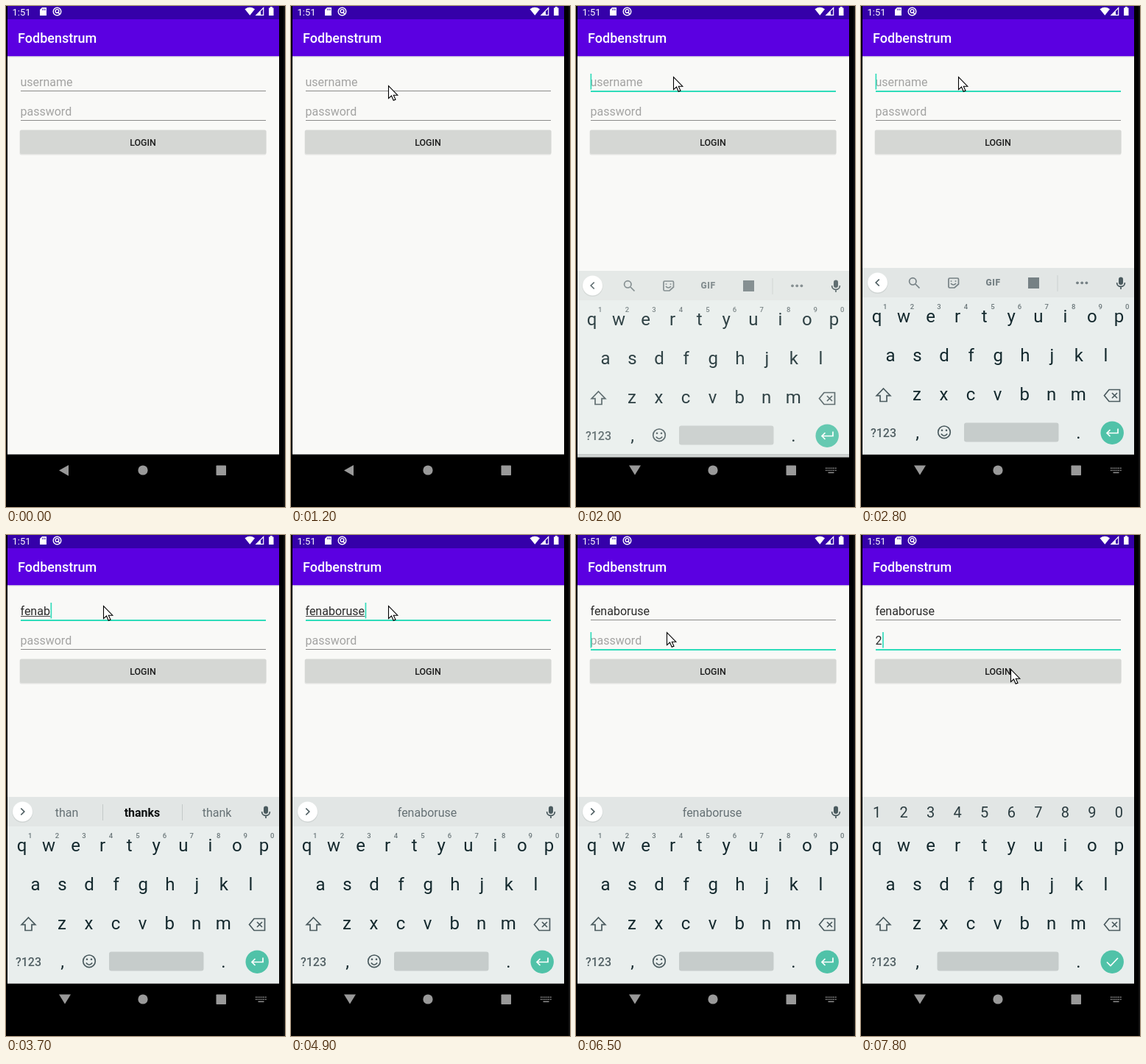
An HTML page for the animation above (8 s loop, 379x681 px).

```html
<!DOCTYPE html>
<html lang="en">
<head>
<meta charset="utf-8">
<title>Login screen</title>
<style>
  html, body { margin: 0; width: 100%; height: 100%; overflow: hidden; background: #000; }
  svg { display: block; width: 379px; height: 681px; font-family: Roboto, "Noto Sans", sans-serif; }
  .mid { text-anchor: middle; }
  .line { fill: none; stroke-width: 1.7; }
  .ink { stroke: #4b5b5f; }
  .field { font-size: 16px; fill: #2b2b2b; }
  .hint { font-size: 16px; fill: #a3a3a2; }
  .key { font-size: 24px; fill: #14292e; }
  .num { font-size: 20px; fill: #2b3c40; }
  .tiny { font-size: 9.5px; font-weight: 500; fill: #6b777a; }
  .sug { font-size: 16px; fill: #667175; }
  .bold { font-weight: 700; fill: #0c0f10; }
</style>
</head>
<body>
<svg viewBox="0 0 379 681">
  <defs>
    <clipPath id="screen"><rect x="2" y="0" width="369" height="609.5"/></clipPath>
  </defs>
  <rect width="379" height="681"/>
  <rect x="377" width="2" height="681" fill="#101010"/>

  <!-- app -->
  <rect x="2" width="369" height="609.5" fill="#f9f9f7"/>
  <rect x="2" y="68" width="369" height="1.5" fill="#dcdbe2"/>
  <rect x="2" width="369" height="18" fill="#3500a9"/>
  <rect x="2" y="18" width="369" height="50.2" fill="#5b00e1"/>
  <g fill="#fff">
    <text x="8.5" y="12.5" font-size="13">1:51</text>
    <path d="M49 2H55V13H46V5Z"/>
    <path d="M49.5 3.5v2.5M51.5 3.5v2.5M53.3 3.5v2.5" stroke="#3500a9" stroke-width=".8"/>
    <circle cx="69.5" cy="7.5" r="5.3" fill="none" stroke="#fff" stroke-width="1.4"/>
    <circle cx="69.5" cy="7" r="2.4" fill="none" stroke="#fff" stroke-width="1.4"/>
    <path d="M70 8l3.5 3.5" stroke="#fff" stroke-width="1.5"/>
    <path d="M324.5 4.2Q331.3 -.6 338 4.2L331.3 12.8Z"/>
    <path d="M340 12.3L349.7 2.5V12.3Z" fill="none" stroke="#fff" stroke-width="1.2"/>
    <path d="M340 12.8L346 7V12.8Z"/>
    <path d="M357 2.5H358.8V1H361.8V2.5H363.5V13H357Z"/>
    <text x="16" y="50" font-size="18" font-weight="500">Fodbenstrum</text>
  </g>

  <text class="hint" id="userHint" x="19.5" y="109">username</text>
  <text class="field" id="user" x="19.5" y="109"></text>
  <rect id="compose" x="20" y="110" height="1" fill="#444"/>
  <rect id="userLine" x="20" width="333"/>
  <text class="hint" id="passHint" x="19.5" y="149">password</text>
  <text class="field" id="pass" x="19.5" y="149"></text>
  <rect id="passLine" x="20" width="333"/>
  <rect id="caret" width="1.7" height="21.5" fill="#35dcbb"/>
  <rect x="18.5" y="169" width="335" height="33.5" rx="2" fill="#e3e4e2"/>
  <rect x="19" y="168.5" width="334.5" height="32.5" rx="2" fill="#d5d7d4"/>
  <text class="mid" x="186" y="190" font-size="12.4" font-weight="500" fill="#1d1d1d">LOGIN</text>

  <!-- navigation -->
  <g fill="#999">
    <path id="back"/>
    <circle cx="186" cy="631" r="6.6"/>
    <rect x="285.5" y="624.5" width="13.5" height="13.5" rx=".8"/>
    <g id="imeIcon" stroke="#8d8d8d" stroke-width="1.5" fill="none">
      <path d="M339 628.2H354M339 631.2H354" stroke-dasharray="1.6 1"/>
      <path d="M342.5 634.3H350.5"/>
    </g>
  </g>
  <rect id="strip" x="2" y="609.5" width="369" height="4" fill="#cfd3d2"/>

  <!-- keyboard -->
  <g clip-path="url(#screen)">
    <g id="board">
      <rect x="2" y="356" width="369" height="264" fill="#e9eeed"/>
      <rect x="2" y="356" width="369" height="40" fill="#e2e6e5"/>
      <g id="keys"></g>
      <g id="hints"></g>
      <g id="digits"></g>
      <g id="bar">
        <circle cx="22.5" cy="377" r="14" fill="#d0d5d4"/>
        <circle cx="22.5" cy="376" r="13.5" fill="#fff"/>
        <path id="chevron" class="line ink"/>
        <rect x="350" y="368.5" width="6" height="10.5" rx="3" fill="#4b5b5f"/>
        <path class="line ink" d="M347.6 376C347.6 383.3 358.4 383.3 358.4 376M353 381.5V385"/>
      </g>
      <g id="tools" fill="#768185" stroke="#768185">
        <circle class="line" cx="70.3" cy="374.3" r="4.7"/>
        <path class="line" d="M74 378l5.5 5.5" stroke-width="2"/>
        <path class="line" d="M120.5 370H131a1.5 1.5 0 0 1 1.5 1.5V378L127 383H120.5a1.5 1.5 0 0 1-1.5-1.5V371.5a1.5 1.5 0 0 1 1.5-1.5ZM122 377Q125.5 381 129 377M122.5 373.2v1.5M128.5 373.2v1.5"/>
        <text class="mid" x="179.5" y="380.2" font-size="12" font-weight="900" letter-spacing=".6" stroke="none">GIF</text>
        <rect x="227" y="369" width="15" height="15" stroke="none"/>
        <path d="M267 366V388" stroke="#cbd1d0"/>
        <g stroke="none"><circle cx="294" cy="376.3" r="1.9"/><circle cx="300.2" cy="376.3" r="1.9"/><circle cx="306.4" cy="376.3" r="1.9"/></g>
      </g>
      <g id="words">
        <path id="dividers" d="M131.5 366V388M239.5 366V388" stroke="#c3c9c8"/>
        <text class="sug mid" x="82.5" y="382.5"></text>
        <text class="sug mid" x="185" y="382.5"></text>
        <text class="sug mid" x="286.5" y="382.5"></text>
      </g>
      <path class="line ink" d="M30.5 520L39.8 529.7H35V537.5H26V529.7H21.2Z"/>
      <path class="line ink" d="M337 521.5H351.5V537.5H337L330.5 529.5ZM341 526l7 7m0-7l-7 7"/>
      <text class="mid" x="30.5" y="585.5" font-size="16" font-weight="500" fill="#536165">?123</text>
      <g id="smile">
        <circle class="line ink" cx="113" cy="579.3" r="8.3"/>
        <path class="line ink" d="M108.8 581.5Q113 587 117.2 581.5"/>
        <circle cx="110" cy="576.8" r="1.3" fill="#4b5b5f"/><circle cx="116" cy="576.8" r="1.3" fill="#4b5b5f"/>
      </g>
      <rect id="space" y="566.5" height="26" rx="3" fill="#c6cccb"/>
      <circle cx="341.2" cy="580.2" r="15.7" fill="#50c2a8"/>
      <path id="enter" class="line" stroke="#fff"/>
    </g>
  </g>

  <path id="cursor" d="M.5 .5V17.6L4.5 14L7.2 20.3L10 19.1L7.3 13.2H12.8Z" fill="#fff" stroke="#000" stroke-width="1.1"/>
</svg>
<script>
const LOOP = 8000, STEP = 100;
const NAME = "fenaboruse";
const TEAL = "#2fdcba", GREY = "#8b8b8a";
const $ = id => document.getElementById(id);
const put = (el, attrs) => { for (const k in attrs) el.setAttribute(k, attrs[k]); };
const show = (id, on) => put($(id), { display: on ? "inline" : "none" });

// Each row: start time, then the values held until the next row.
const cursorPath = [
  [0, -50, 0], [700, 356, 25], [800, 235, 66], [900, 132, 100], [1200, 132, 108],
  [1300, 132, 104], [1400, 132, 100], [1500, 132, 96],
  [5400, 165, 104], [5500, 232, 122], [5600, 298, 146], [5700, 338, 161],
  [5800, 270, 154], [5900, 180, 141], [6000, 123, 132],
  [7600, 142, 146], [7700, 178, 168], [7800, 203, 182]
];
// Keyboard offset and opacity while it slides in.
const slide = [[0, 300, 0], [1900, 60, .5], [2000, 4, .88], [2100, 1, .96], [2200, 0, 1]];
const typed = [
  [0, 0], [3000, 1], [3200, 2], [3400, 3], [3600, 4], [3700, 5],
  [4000, 6], [4100, 7], [4500, 8], [4700, 9], [4900, 10]
];
const caretOn = [[0, 0], [1900, 1], [2300, 0], [2800, 1], [5400, 0], [5900, 1], [7300, 0], [7800, 1]];
const suggest = [
  [0, "", "", ""], [3200, "that", "thanks", "thank"], [3600, "than", "thanks", "thank"],
  [4000, NAME.slice(0, 6), "thanks", "thank"], [4100, NAME.slice(0, 7), "thanks", "thank"],
  [4700, NAME.slice(0, 9), "thanks", "thank"], [4900, "", NAME, ""]
];
const at = (table, t) => table.filter(row => row[0] <= t).pop().slice(1);

function addRow(parent, chars, x, y, cls) {
  [...chars].forEach((ch, i) => {
    const el = document.createElementNS("http://www.w3.org/2000/svg", "text");
    put(el, { x: x + 36.55 * i, y, class: cls + " mid" });
    el.textContent = ch;
    $(parent).append(el);
  });
}
addRow("keys", "qwertyuiop", 21.5, 430, "key");
addRow("keys", "asdfghjkl", 40, 483, "key");
addRow("keys", "zxcvbnm", 76, 535.5, "key");
addRow("keys", ",", 76.5, 587.5, "key");
addRow("keys", ".", 295.5, 587.5, "key");
addRow("hints", "1234567890", 32.8, 412, "tiny");
addRow("digits", "1234567890", 21.5, 384.3, "num");

function setLine(id, y, on) {
  put($(id), { y, height: on ? 2 : 1, fill: on ? TEAL : GREY });
}

function render(t) {
  const open = t >= 1900, onPass = t >= 6300, secret = t >= 6800;
  const [cx, cy] = at(cursorPath, t);
  const [dy, opacity] = at(slide, t);
  const [count] = at(typed, t);
  put($("cursor"), { transform: `translate(${cx} ${cy})` });

  $("user").textContent = NAME.slice(0, count);
  $("pass").textContent = secret ? "2" : "";
  show("userHint", !count);
  show("passHint", !secret);
  setLine("userLine", 115, t >= 1700 && !onPass);
  setLine("passLine", 155, onPass);

  const width = $(onPass ? "pass" : "user").getComputedTextLength();
  show("compose", count && !onPass);
  put($("compose"), { width: onPass ? 0 : width });
  show("caret", at(caretOn, t)[0]);
  put($("caret"), { x: 19.5 + width + (width ? .6 : 0), y: onPass ? 132 : 92 });

  show("board", open);
  put($("board"), { transform: `translate(0 ${dy})`, opacity });
  show("strip", open && dy > 1);
  show("imeIcon", open);
  put($("back"), { d: open ? "M72 624.5H88L80 637.5Z" : "M72 631.3L85 624V638.7Z" });

  const words = t >= 3200 && !secret;
  show("tools", t < 3200);
  show("words", words);
  show("bar", !secret);
  show("hints", !secret);
  show("digits", secret);
  show("smile", !secret);
  put($("chevron"), { d: words ? "M20.3 371.5l4.5 4.5l-4.5 4.5" : "M24.7 371.5l-4.5 4.5l4.5 4.5" });
  put($("space"), secret ? { x: 103.5, width: 165 } : { x: 140, width: 128.5 });
  put($("enter"), { d: secret ? "M334 580.5l5 5l10-10.5" : "M349 574.5V580.5H334M338.5 576l-4.5 4.5l4.5 4.5" });

  const list = at(suggest, t);
  $("words").querySelectorAll("text").forEach((el, i) => {
    el.textContent = list[i];
    el.classList.toggle("bold", i === 1 && list[0] !== "");
  });
  show("dividers", list[0]);
}

const start = performance.now();
function frame() {
  const t = (performance.now() - start) % LOOP;
  render(Math.floor(t / STEP) * STEP);
  requestAnimationFrame(frame);
}
frame();
</script>
</body>
</html>
```
